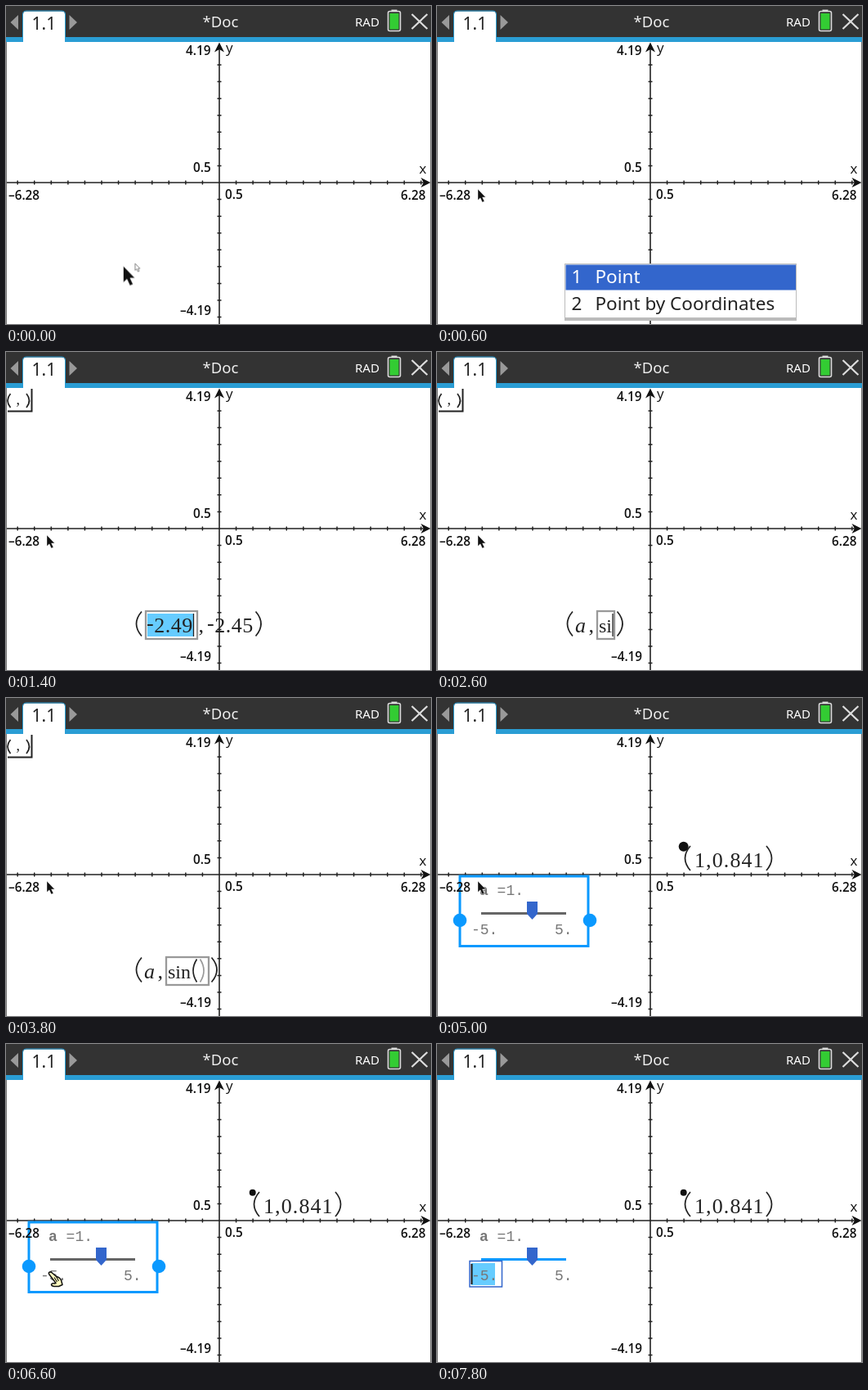
Write an HTML page that moves like this. It is 520 by 389 pixels and loops after 8 s.

```html
<!DOCTYPE html>
<html lang="en">
<head>
<meta charset="utf-8">
<title>Graph with slider</title>
<style>
  html, body { margin: 0; width: 100%; height: 100%; overflow: hidden; background: #fff; }
  svg { display: block; width: 520px; height: 389px; }
  text { white-space: pre; }
  .ui { font-family: "Noto Sans", "Open Sans", sans-serif; }
  .axis { font: 600 15.3px "Open Sans", "Noto Sans", sans-serif; fill: #111; }
  .name { font-weight: 500; font-size: 17px; }
  .math { font: 26px "Liberation Serif", serif; letter-spacing: .5px; fill: #222; }
  .wide { letter-spacing: 1.1px; }
  .fn { font-size: 24px; letter-spacing: 0; }
  .var { font-style: italic; font-size: 26px; }
  .small { font-size: 18px; }
  .mono { font: 18px "Liberation Mono", monospace; fill: #777; }
  .paren { fill: none; stroke: #222; stroke-width: 1.7; }
  .soft { stroke: #999; }
</style>
</head>
<body>
<svg id="stage" viewBox="0 0 520 389"></svg>
<script>
const LOOP = 8000;
const BLUE = '#0a99ff', DEEP = '#3366cc', PICK = '#66ccff';
const OX = 261, OY = 216, STEP = 20.57;

// Wraps markup so it is visible only between two times.
const during = (from, to, body) => `<g data-from="${from}" data-to="${to}">${body}</g>`;
const text = (x, y, s, cls, extra = '') => `<text x="${x}" y="${y}" class="${cls}" ${extra}>${s}</text>`;
const rect = (x, y, w, h, extra) => `<rect x="${x}" y="${y}" width="${w}" height="${h}" ${extra}/>`;
const line = (d, color, w) => `<path d="${d}" fill="none" stroke="${color}" stroke-width="${w}"/>`;

function paren(x, y, side, h = 30, w = 7, cls = '') {
  const tip = side === '(' ? x + w : x, bulge = side === '(' ? x - w + 1 : x + 2 * w - 1;
  return `<path class="paren ${cls}" d="M${tip} ${y}Q${bulge} ${y + h / 2} ${tip} ${y + h}"/>`;
}

const negative = (x, y, s) =>
  text(x, y, `<tspan dy="-3">-</tspan><tspan dy="3">${s}</tspan>`, 'math');

const caret = x => line(`M${x} 320V348`, '#222', 1.3);

const field = (left, right) =>
  rect(left + 1, 317, right - left - 2, 34, 'fill="#fff" stroke="#999" stroke-width="2.300"');

function header() {
  return rect(0, 0, 520, 38, 'fill="#333"') + rect(0, 38, 520, 6, 'fill="#2a9dd4"') +
    '<path d="M21 44V10Q21 6.500 25 6.500H68Q72 6.500 72 10V44Z" fill="#fff"/>' +
    line('M20.500 38V10Q20.500 6 25 6H68Q72.500 6 72.500 10V38', '#2a9dd4', 1) +
    '<path d="M15 11V29L5.500 20ZM77.500 11V29L87 20Z" fill="#999"/>' +
    text(31.5, 29, '1.1', 'ui', 'font-size="21" fill="#222"') +
    text(240.5, 26, '*Doc', 'ui', 'font-size="18.500" fill="#eee"') +
    text(427, 24.5, 'RAD', 'ui', 'font-size="15" font-weight="500" fill="#fff"') +
    rect(471.5, 4.5, 7, 3, 'fill="#ddd"') +
    rect(467.5, 6.5, 15, 24, 'rx="2" fill="#333" stroke="#ddd" stroke-width="1.600"') +
    rect(469.5, 9, 11, 19.5, 'fill="#3c3"') +
    line('M496.500 10L515.500 28M515.500 10L496.500 28', '#ddd', 2.2);
}

function axes() {
  let ticks = '';
  for (let i = -12; i <= 12; i++) {
    if (i) ticks += `M${OX + i * STEP} ${OY - 2.5}v5`;
    if (i && Math.abs(i) <= 8) ticks += `M${OX - 2.5} ${OY + i * STEP}h5`;
  }
  return line(`M1 ${OY}H514M${OX} 50V389`, '#222', 1.6) + line(ticks, '#222', 1.5) +
    '<path d="M261 44.500L267 56.500 261 53 255 56.500ZM519.500 216L507.500 222 511 216 507.500 210Z" fill="#111"/>' +
    line('M.500 44V389M519.500 44V389', '#777', 1);
}

function labels() {
  const items = [[220, 60, '4.19'], [213, 378, '–4.19'], [229, 203, '0.5'], [268, 236, '0.5'],
    [3, 237, '–6.28'], [483, 237, '6.28']];
  return items.map(([x, y, s]) => text(x, y, s, 'axis')).join('') +
    text(269, 57, 'y', 'axis name') + text(505.5, 205, 'x', 'axis name');
}

function menu(pick) {
  const rows = ['Point', 'Point by Coordinates'];
  return rect(156.5, 315.5, 283, 69, 'fill="#fff" stroke="#bbb"') +
    rect(156, 381, 284, 4, 'fill="#bbb"') +
    rect(157.5, 316.5 + pick * 32.5, 281.5, 31, `fill="${DEEP}"`) +
    rows.map((s, i) => {
      const style = `font-size="22.500" fill="${i === pick ? '#fff' : '#222'}"`;
      return text(164.5, 339 + i * 33, i + 1, 'ui', style) + text(193.5, 339 + i * 33, s, 'ui', style);
    }).join('');
}

const toolIcon = () => rect(2, 45, 29, 28, 'fill="#fff"') + line('M2 72.500H31.500V45', '#222', 2) +
  paren(1.5, 51, '(', 17, 4) + text(12.5, 64, ',', 'math small') + paren(25, 51, ')', 17, 4);

const open = paren(159, 317.5, '(');

function firstEntry() {
  return open + field(170, 235) + rect(173, 320, 56, 28, `fill="${PICK}"`) +
    negative(172, 343, '2.49') + caret(229.5) +
    text(235.5, 343, ',', 'math') + negative(246, 343, '2.45') + paren(305.5, 317.5, ')');
}

// The second field grows with what is typed; the bracket follows it.
function secondEntry(end, body) {
  return open + text(169, 343, 'a', 'math var') + text(185.5, 343, ',', 'math') +
    field(195, end - 1) + body + paren(end + 1.5, 317.5, ')');
}

const typed = s => text(198, 343, s, 'math fn');
const call = typed('sin') + paren(228.5, 319.5, '(', 28, 5);
const close = (x, cls) => paren(x, 319.5, ')', 28, 5, cls);

function entries() {
  const arg = call + text(236, 343, 'a', 'math var');
  return during(1400, 1800, firstEntry()) +
    [[1800, 2200, 262, rect(198, 320, 55, 28, `fill="${PICK}"`) + negative(198, 343, '2.45') + caret(254)],
     [2200, 2600, 212, typed('s') + caret(208)],
     [2600, 3000, 219, typed('si') + caret(215)],
     [3000, 3400, 233, typed('sin') + caret(228)],
     [3400, 3800, 250, call + close(237.5, 'soft') + caret(236)],
     [3800, 4200, 250, call + close(237.5, 'soft')],
     [4200, 4600, 262, arg + close(251, 'soft') + caret(249)],
     [4600, 5000, 262, arg + close(251)]]
      .map(([from, to, end, body]) => during(from, to, secondEntry(end, body))).join('');
}

function point() {
  const dot = r => `<circle cx="301.700" cy="181.700" r="${r}" fill="#111"/>`;
  return during(5000, 5800, dot(6)) + during(5800, LOOP, dot(4)) +
    during(5000, LOOP, paren(303, 181, '(') + text(315, 207, '1,0.841', 'math wide') + paren(403, 181, ')'));
}

function slider() {
  const frame = rect(28, 218, 157, 85.5, `fill="none" stroke="${BLUE}" stroke-width="3"`) +
    [28, 187].map(x => `<circle cx="${x}" cy="272" r="8.300" fill="${BLUE}"/>`).join('') +
    line('M54 263.500H158', '#666', 3);
  const edit = line('M54 263.500H158', BLUE, 3) +
    rect(40, 265.5, 39.5, 31.5, `fill="#fff" stroke="${DEEP}" stroke-width="1.500"`) +
    rect(42, 268, 29, 27, `fill="${PICK}"`);
  return during(5000, 7000, frame) + during(7000, LOOP, edit) +
    during(5000, LOOP,
      `<path d="M110 249H123V264L116.500 271 110 264Z" fill="${DEEP}"/>` +
      text(52, 241, '<tspan font-weight="700">a</tspan> =1.', 'mono') +
      text(42, 289, '-5.', 'mono') + text(144, 289, '5.', 'mono')) +
    during(7000, 7400, line('M42.500 269V294', '#111', 2)) +
    during(7800, LOOP, line('M42.500 269V294', '#111', 2));
}

const ARROW = 'M0 0V13.500L3 10.800 5.400 16 8 15 5.600 9.900H9.500Z';
const arrow = (x, y, k = 1, paint = 'fill="#111" stroke="#fff" stroke-width=".400"') =>
  `<path transform="translate(${x} ${y}) scale(${k})" d="${ARROW}" ${paint}/>`;

const hand = (x, y) => `<g transform="translate(${x} ${y})" stroke="#111" stroke-width="1.500" stroke-linejoin="round">` +
  '<path d="M1 1.500Q3 0 5 2L10 6.500Q14 7 16 11L17.500 16.500 13 18.500H7Q4 18 4 16Q5 14 8 15L9.500 14.500 1.500 4Q.500 2.500 1 1.500Z" fill="#fffbc0"/>' +
  '<path d="M10 6.500L13 12M7.500 7.500L11 13" fill="none" stroke-width="1.100"/></g>';

function pointers() {
  const arrows = [[600, 50, 224], [5400, 147, 299], [5600, 123, 309.5], [5800, 106, 303.5]];
  const hands = [[6000, 93, 290], [6200, 83, 289], [6400, 78, 288], [6600, 51.5, 278]];
  const track = (steps, end, draw) => steps.map(([t, x, y], i) =>
    during(t, i + 1 < steps.length ? steps[i + 1][0] : end, draw(x, y))).join('');
  return during(0, 200, arrow(143.5, 318, 1.5)) +
    during(0, 600, arrow(158, 315, .62, 'fill="#fff" stroke="#777" stroke-width="1.500"')) +
    track(arrows, 6000, arrow) + track(hands, 7000, hand);
}

// The track helper passes only a place, so arrows keep their default size.
const stage = document.getElementById('stage');
stage.innerHTML = rect(0, 0, 520, 389, 'fill="#fff"') + axes() + slider() + labels() + header() +
  during(600, 1000, menu(0)) + during(1000, 1400, menu(1)) +
  during(1400, 5000, toolIcon()) + entries() + point() + pointers();

// Every part switches hard on the shared clock.
for (const part of stage.querySelectorAll('[data-from]')) {
  const from = part.dataset.from / LOOP, to = part.dataset.to / LOOP;
  const steps = [{ offset: from, opacity: 1 }];
  if (from > 0) steps.unshift({ offset: 0, opacity: 0 });
  if (to < 1) steps.push({ offset: to, opacity: 0 });
  steps.push({ offset: 1, opacity: to < 1 ? 0 : 1 });
  const frames = steps.map(s => ({ ...s, easing: 'step-end' }));
  part.animate(frames, { duration: LOOP, iterations: Infinity }).startTime = 0;
}
</script>
</body>
</html>
```
